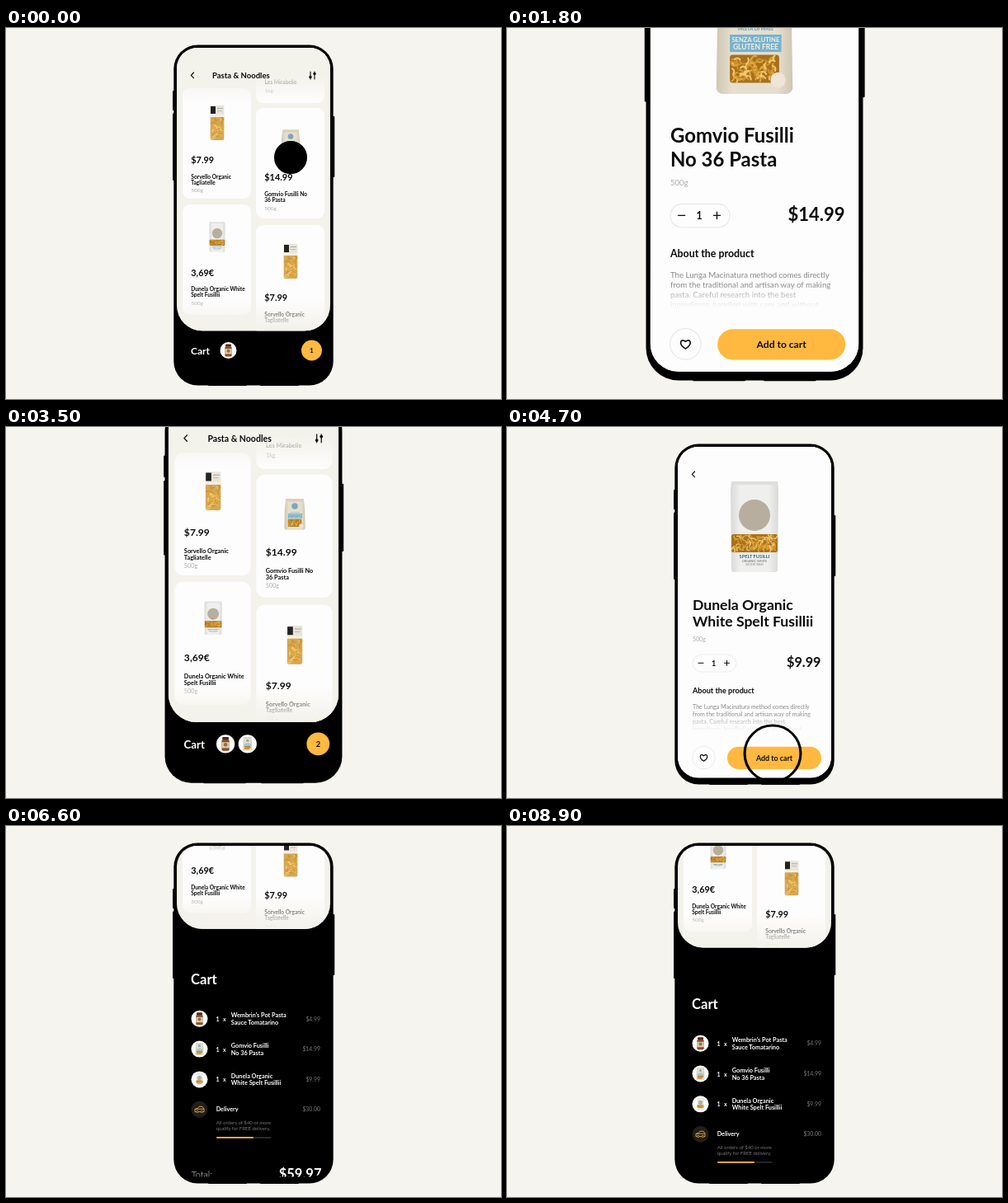
An HTML page that plays this animation: 600 px wide and 450 px high, repeating every 9000 ms.

```html
<!DOCTYPE html>
<html lang="en">
<head>
<meta charset="utf-8">
<title>Grocery cart</title>
<style>
  html, body { margin: 0; width: 100%; height: 100%; overflow: hidden; background: #f6f4ee; }
  svg { display: block; width: 100vw; height: 100vh; font-family: Lato, sans-serif; }
</style>
</head>
<body>
<svg id="stage" viewBox="0 0 600 450"></svg>
<script>
const INK = '#0b0b0b', GOLD = '#ffb940', PAPER = '#f3f2eb', CARD = '#fefdfd';

// Markup helpers; text y is the middle of the capitals
const text = (x, y, size, str, fill = INK, weight = 700, anchor = 'start') =>
  `<text x="${x}" y="${y + size * 0.36}" font-size="${size}" font-weight="${weight}" fill="${fill}" text-anchor="${anchor}">${str}</text>`;
const rect = (x, y, w, h, fill, r = 0, extra = '') =>
  `<rect x="${x}" y="${y}" width="${w}" height="${h}" rx="${r}" fill="${fill}" ${extra}/>`;
const circle = (x, y, r, fill, extra = '') => `<circle cx="${x}" cy="${y}" r="${r}" fill="${fill}" ${extra}/>`;
const path = (d, stroke, width = 1, fill = 'none') =>
  `<path d="${d}" fill="${fill}" stroke="${stroke}" stroke-width="${width}" stroke-linecap="round" stroke-linejoin="round"/>`;
const pose = (x, y, s = 1) => `translate(${x} ${y}) scale(${s})`;
const use = (art, x, y, s = 1, id = '') => `<use id="${id || art + x + y}" href="#${art}" transform="${pose(x, y, s)}"/>`;
const fade = (id, color, from, to) =>
  `<linearGradient id="${id}" x2="0" y2="1"><stop offset="0" stop-color="${color}" stop-opacity="${from}"/><stop offset="1" stop-color="${color}" stop-opacity="${to}"/></linearGradient>`;
const sheen = (id, edge, middle) =>
  `<linearGradient id="${id}"><stop offset="0" stop-color="${edge}"/><stop offset=".2" stop-color="${middle}"/><stop offset=".8" stop-color="${middle}"/><stop offset="1" stop-color="${edge}"/></linearGradient>`;

let seed = 7;
const random = () => (seed = seed * 16807 % 2147483647) / 2147483647;
function pasta(x, y, w, h, size, base = '#a8701c') {
  let out = rect(x, y, w, h, base, size / 2);
  for (let i = 0; i < w * h / (size * size) * 1.8; i++) {
    const px = x + size / 2 + random() * (w - size), py = y + size / 2 + random() * (h - size);
    const a = random() * 6.3, dx = Math.cos(a) * size / 2, dy = Math.sin(a) * size / 2;
    out += path(`M${px - dx} ${py - dy}Q${px + dy} ${py - dx} ${px + dx} ${py + dy}`, ['#dfa63c', '#cf922b', '#efc872'][i % 3], size / 3.5);
  }
  return out;
}

const packs = {
  blue: path('M-29 -50H29L33 -15 34 46Q33 51 27 51H-27Q-33 51-34 46L-33 -15Z', 'none', 0, 'url(#cream)')
    + rect(-29, -50, 58, 9, '#d8d0bd') + circle(0, -26, 10, '#7fa7b8')
    + text(1, -7, 4.5, 'PASTA DI MAIS', '#5c97b5', 700, 'middle')
    + rect(-22, -2, 46, 15.5, '#79b2cd')
    + text(1, 2.5, 5.6, 'SENZA GLUTINE', '#f3f0e4', 700, 'middle') + text(1, 9.3, 6.2, 'GLUTEN FREE', '#f3f0e4', 700, 'middle')
    + pasta(-22, 16, 44, 25, 5) + circle(21, 38.5, 6.8, '#efe4d8'),
  white: path('M-28 -55H28L29 -45 28 52Q28 55 25 55H-25Q-28 55-28 52L-29 -45Z', 'none', 0, 'url(#silver)')
    + rect(-28, -55, 56, 4, '#dededc')
    + circle(0, -14, 19, '#b8ae9f') + pasta(-28, 9, 56, 22, 5)
    + text(0, 36, 5.7, 'SPELT FUSILLI', '#2d6b80', 700, 'middle')
    + text(0, 41.3, 3.8, 'ORGANIC WHITE', '#666', 400, 'middle') + text(0, 46, 2.8, 'ANCIENT GRAIN', '#888', 400, 'middle'),
  bag: rect(-8.3, -21, 16.6, 15, '#e9e4d8') + pasta(-8.3, -8, 16.6, 29, 4, '#d3a75a') + rect(-8, -20, 6, 9, '#222')
    + rect(0, -18, 7, 1, '#aaa') + rect(0, -15, 6, 1, '#bbb') + rect(-8.3, -10, 16.6, 3, '#f3efe6'),
  jar: rect(-3.5, -7.5, 7, 3, '#4b2b1d', 1) + rect(-4.2, -4.8, 8.4, 12.3, '#8a4a2a', 1.6)
    + rect(-4.2, -2, 8.4, 6.5, '#dcc9a6') + circle(0, 0.8, 2, '#8c6d4c')
};

// x, top, price middle, price, name lines, pack, pack offset, pack scale
const cards = [
  [214, 73, 160, '$7.99', 'Sorvello Organic', 'Tagliatelle', 'bag', -45, 1],
  [214, 214, 296.7, '3,69€', 'Dunela Organic White', 'Spelt Fusillii', 'white', -43, 0.33],
  [303, 97, 181.5, '$14.99', 'Gomvio Fusilli No', '36 Pasta', 'blue', -41.3, 0.335],
  [303, 239, 327, '$7.99', 'Sorvello Organic', 'Tagliatelle', 'bag', -44, 1]
];
const card = ([x, top, y, price, a, b, pack, dy, s]) => rect(x, top, 83, 134, CARD, 9)
  + use(pack, x + 42, y + dy, s) + text(x + 10.3, y, 10.9, price)
  + text(x + 10.3, y + 20.3, 6.6, a) + text(x + 10.3, y + 27.4, 6.6, b)
  + text(x + 10.3, y + 37, 6.5, '500g', '#aaa', 400);

const list = rect(207, 0, 186, 430, PAPER) + rect(303, -40, 83, 131, CARD, 9)
  + text(313.5, 65.5, 6.6, 'Les Mirabelle') + text(313.5, 76, 6.5, '1kg', '#aaa', 400)
  + cards.map(card).join('')
  + rect(207, 20, 186, 38, PAPER) + rect(207, 58, 186, 32, 'url(#down)')
  + rect(207, 328, 186, 36, 'url(#up)') + rect(207, 364, 186, 70, PAPER)
  + text(250, 58, 9.5, 'Pasta &amp; Noodles')
  + path('M369 53V62M374 53V62', INK, 1.1) + circle(369, 59.5, 1.7, INK) + circle(374, 55.5, 1.7, INK);

const blurb = ['The Lunga Macinatura method comes directly', 'from the traditional and artisan way of making',
  'pasta. Careful research into the best', 'ingredients, handled with care and without'];
const detail = (id, pack, a, b, price) => `<g id="${id}">${rect(207, 0, 186, 430, CARD)}<g id="${id}Info">`
  + text(225, 215.3, 17.6, a) + text(225, 236, 17.6, b) + text(225, 257, 7, '500g', '#aaa', 400)
  + rect(225, 276, 53, 21, 'none', 10.5, 'stroke="#e6e6ea" stroke-width=".8"')
  + path('M232 286.3H238M263.5 286.3H269.5M266.5 283.3V289.3', INK, 1)
  + text(250.7, 286.6, 9, '1', INK, 700, 'middle') + text(380.5, 285.6, 16.2, price, INK, 700, 'end')
  + text(225, 320, 9.1, 'About the product')
  + blurb.map((line, i) => text(225, 339 + i * 9, 7.1, line, '#888', 400)).join('')
  + rect(220, 348, 170, 21, 'url(#haze)') + rect(220, 369, 170, 10, CARD)
  + circle(238.5, 401, 13.8, 'none', 'stroke="#e6e6ea" stroke-width=".8"')
  + path('M238.5 405.2C231.5 400.8 234.4 395.3 238.5 398.8C242.6 395.3 245.5 400.8 238.5 405.2Z', INK, 1.2)
  + rect(267, 387.7, 114, 27.4, GOLD, 13.7) + text(324, 401.3, 8.9, 'Add to cart', INK, 700, 'middle')
  + `</g></g>${use(pack, 0, 0, 1, id + 'Hero')}`;

const goods = [['jar', 1], ['blue', 0.145], ['white', 0.135]];
const thumb = (i, x, y) => circle(x, y, 10, '#fff') + use(goods[i][0], x, y, goods[i][1]);
const row = (i, a, b, price) => {
  const y = 161 + i * 36.8;
  return thumb(i, 234.5, y) + text(254.5, y + 0.5, 7, '1', '#fff') + text(263, y + 0.5, 7, 'x', '#fff')
    + text(272.7, y - 4.2, 7.3, a, '#fff') + text(272.7, y + 4.4, 7.3, b, '#fff')
    + text(381, y + 0.3, 6.9, price, '#777', 400, 'end');
};
const wheel = x => circle(x, 273.7, 1.2, '#211e1a', `stroke="${GOLD}" stroke-width=".7"`);
const cart = text(224, 113, 16.6, 'Cart', '#fff')
  + row(0, "Wembrin's Pot Pasta", 'Sauce Tomatarino', '$4.99')
  + row(1, 'Gomvio Fusilli', 'No 36 Pasta', '$14.99')
  + row(2, 'Dunela Organic', 'White Spelt Fusillii', '$9.99')
  + circle(234.5, 271, 10, '#211e1a')
  + path('M229 273.5V270.5L232 270 234 267.5H238L240 270.5V273.5ZM230 270.5H239.5', GOLD, 0.8)
  + wheel(231.8) + wheel(237.3)
  + text(254.7, 271, 7.2, 'Delivery', '#fff') + text(381, 271, 6.9, '$30.00', '#777', 400, 'end')
  + text(254.7, 286.7, 6, 'All orders of $40 or more', '#777', 400)
  + text(254.7, 294, 6, 'qualify for FREE delivery.', '#777', 400)
  + rect(255, 304.5, 66.5, 1.4, '#3a3a3a', 0.7) + rect(255, 304.3, 45, 1.7, GOLD, 0.8)
  + text(224.7, 350.5, 11, 'Total:', '#ddd', 300) + text(382.5, 349, 16.5, '$59.97', '#fff', 700, 'end')
  + rect(224.5, 388, 156.5, 27, GOLD, 13.5) + text(299.7, 401.5, 8.7, 'Next', INK, 700, 'middle');

const bar = text(224, 391.3, 12, 'Cart', '#fff')
  + [0, 1, 2].map(i => `<g id="thumb${i}">${thumb(i, 0, 0)}</g>`).join('')
  + circle(370.5, 391, 12.5, GOLD) + '<g id="count"></g>';

const stage = document.getElementById('stage');
stage.innerHTML = `<defs>
  ${fade('down', PAPER, 1, 0)}${fade('up', PAPER, 0, 1)}${fade('haze', CARD, 0, 1)}
  ${sheen('cream', '#cfc6b2', '#e6dfce')}${sheen('silver', '#d9d9d7', '#efefed')}
  <clipPath id="screen">${rect(207, 24, 186, 401.6, INK, 25)}</clipPath>
  <clipPath id="sheetClip"><rect id="sheetShape" x="207" y="-400" width="186"/></clipPath>
  ${Object.entries(packs).map(([id, art]) => `<g id="${id}">${art}</g>`).join('')}
  </defs>
  <g id="phone">
    ${rect(202, 76, 3, 24, INK, 1)}${rect(202, 103.5, 3, 81.5, INK, 1)}${rect(395, 107, 3.3, 74, INK, 1)}
    ${rect(203.3, 20.5, 193.4, 413, '#000', 29)}
    ${rect(245, 430, 47, 4, '#000', 1)}${rect(308, 430, 47, 4, '#000', 1)}
    <g clip-path="url(#screen)">
      <g id="cart">${cart}</g>
      <g id="bar">${bar}</g>
      <g id="sheet"><g clip-path="url(#sheetClip)">
        ${list}
        ${detail('first', 'blue', 'Gomvio Fusilli', 'No 36 Pasta', '$14.99')}
        ${detail('second', 'white', 'Dunela Organic', 'White Spelt Fusillii', '$9.99')}
        ${path('M227.5 54L224.3 57.3 227.5 60.6', INK, 1.2)}
      </g></g>
    </g>
    <circle id="cursor"/>
  </g>`;

const el = id => document.getElementById(id);
const set = (id, attrs) => { for (const k in attrs) el(id).setAttribute(k, attrs[k]); };
const span = (t, a, b) => Math.min(1, Math.max(0, (t - a) / (b - a)));
const mix = (a, b, p) => a + (b - a) * p;
const glide = (t, a, b) => {
  const p = span(t, a, b);
  return p < 0.5 ? 8 * p ** 4 : 1 - 8 * (1 - p) ** 4;
};
const out = (t, a, b, power) => 1 - (1 - span(t, a, b)) ** power;

function showDetail(id, enter, leave, from, to) {
  const alpha = enter * (1 - leave);
  set(id, { opacity: alpha });
  set(id + 'Info', { transform: `translate(0 ${24 * (1 - enter)})` });
  set(id + 'Hero', {
    opacity: enter > 0.002 ? 1 - leave : 0,
    transform: pose(mix(from[0], 300, enter), mix(from[1], to, enter), mix(from[2], 1, enter))
  });
  return alpha;
}

const taps = [[100, 345, 157], [2400, 322, 396], [3850, 255, 254], [4500, 322, 396]];
// start, x, from y, to y, radius, move start, move end, end
const swipes = [[6000, 300, 415, 330, 17, 6080, 6400, 6450], [7700, 293, 258, 350, 14.7, 8150, 8750, 8700]];

function drawCursor(t) {
  set('cursor', { r: 0, 'stroke-width': 0 });
  for (const [at, x, y] of taps) {
    if (t < at - 350 || t > at + 320) continue;
    const p = out(t, at, at + 320, 2), edge = 20 * out(t, at - 350, at - 150, 3) + 18 * p, hole = 37.6 * p;
    set('cursor', {
      cx: x, cy: y, r: (edge + hole) / 2, 'stroke-width': edge - hole,
      stroke: '#000', fill: p ? 'none' : '#000'
    });
  }
  for (const [start, x, y0, y1, r, a, b, end] of swipes) {
    if (t < start || t > end) continue;
    set('cursor', {
      cx: x, cy: mix(y0, y1, glide(t, a, b)), fill: '#fff',
      r: r * out(t, start, start + 150, 3) * (1 - span(t, end - 150, end))
    });
  }
}

function draw(t) {
  const zoom = 1 + 0.36 * (glide(t, 250, 1250) - glide(t, 3000, 3900));
  set('phone', { transform: `translate(300 450) scale(${zoom}) translate(-300 -450)` });

  const shown = showDetail('first', glide(t, 200, 900), glide(t, 2700, 3300), [345, 140.2, 0.335], 127)
    + showDetail('second', glide(t, 3950, 4500), glide(t, 4900, 5500), [256, 253.7, 0.33], 121);
  set('sheetShape', { height: 400 + mix(367.3, 425.6, shown), rx: mix(31, 25, shown) });

  const open = out(t, 6100, 7560, 4) - glide(t, 8500, 9442);
  set('sheet', { transform: `translate(0 ${-298 * open})` });
  set('cart', { transform: `translate(0 ${391 * (1 - open)})` });
  set('bar', { transform: `translate(0 ${-298 * open})`, opacity: Math.max(0, 1 - 4 * open) });

  const pops = [1, out(t, 3000, 3350, 3), out(t, 5200, 5550, 3)];
  pops.forEach((p, i) => set('thumb' + i, { transform: pose(269.5 + 24 * i, 391, p) }));
  el('count').innerHTML = text(370.5, 391, 8.3, pops.filter(p => p > 0).length, INK, 700, 'middle');
  drawCursor(t);
}

const begin = performance.now();
function tick() {
  draw((performance.now() - begin) % 9000);
  requestAnimationFrame(tick);
}
tick();
</script>
</body>
</html>
```
